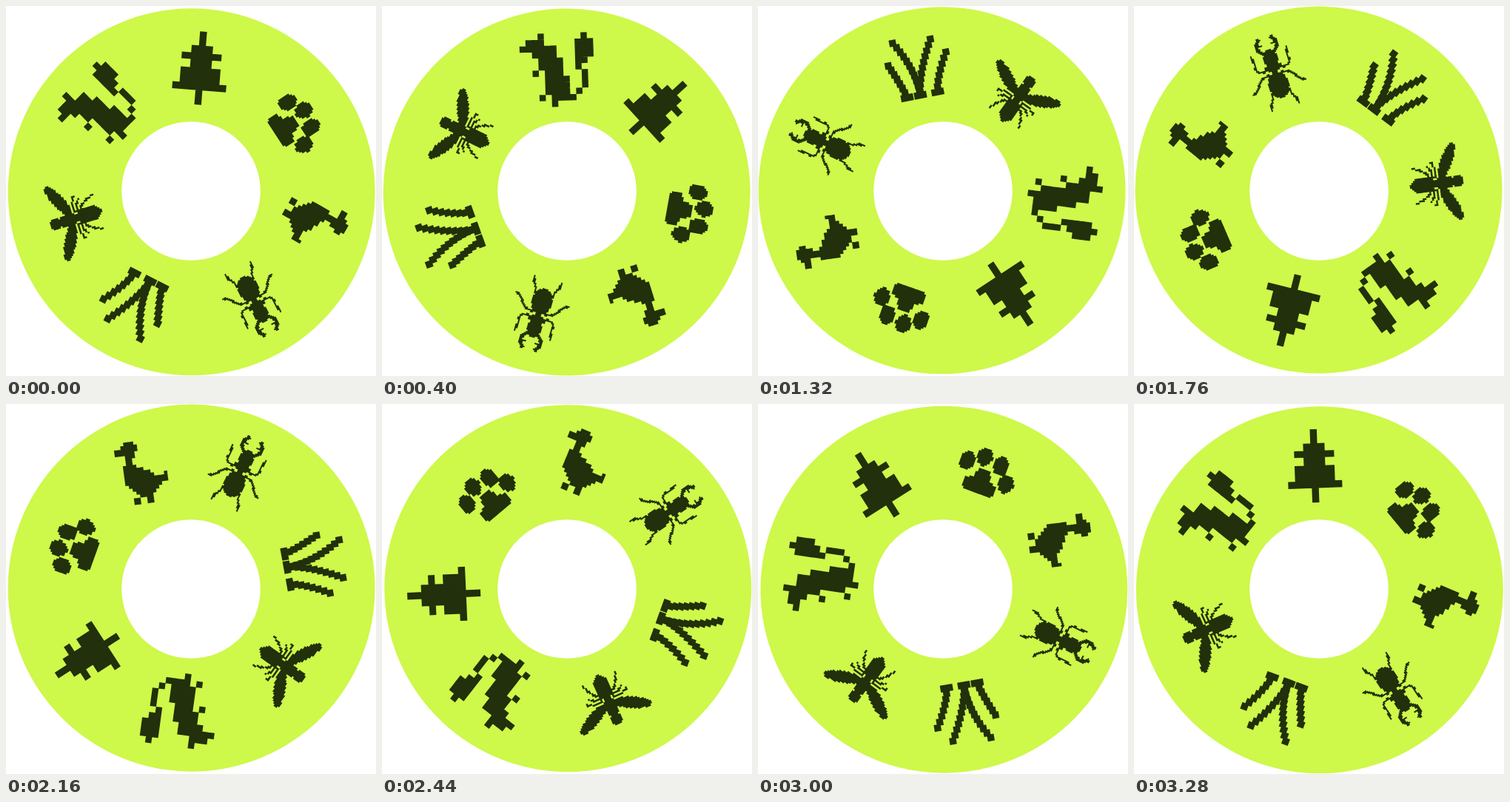
Write an HTML page with a canvas that moves like this. It is 500 by 500 pixels and loops after 3320 ms.

```html
<!DOCTYPE html>
<html lang="en">
<head>
<meta charset="utf-8">
<title>Nature wheel</title>
<style>
  html, body { margin: 0; width: 100%; height: 100%; overflow: hidden; background: #fff; }
  canvas { display: block; width: 500px; height: 500px; }
</style>
</head>
<body>
<canvas id="stage"></canvas>
<script>
const LOOP = 3320, STEP_MS = 40, STEP_DEG = 4.31;
const LIME = '#cef84a', DARK = '#22300b';
const MID = 250;
const rad = deg => deg * Math.PI / 180;

const canvas = document.getElementById('stage');
const ctx = canvas.getContext('2d');
const probe = document.createElement('canvas').getContext('2d');
const density = window.devicePixelRatio || 1;
canvas.width = canvas.height = 500 * density;

// Collects ovals and limbs, then rasterises them to square cells
function pixelate(cell, build) {
  const solids = new Path2D(), limbs = [], shape = new Path2D();
  build({
    oval(x, y, rx, ry, turn = 0) {
      const part = new Path2D();
      part.ellipse(x, y, rx, ry, rad(turn), 0, 2 * Math.PI);
      solids.addPath(part);
    },
    limb(width, d) { limbs.push([width, new Path2D(d)]); },
    solid(d) { solids.addPath(new Path2D(d)); },
    dot(x, y) { solids.rect(x, y, cell, cell); }
  });
  const filled = (i, j) => {
    const x = (i + 0.5) * cell, y = (j + 0.5) * cell;
    return probe.isPointInPath(solids, x, y) || limbs.some(([width, path]) => {
      probe.lineWidth = width;
      return probe.isPointInStroke(path, x, y);
    });
  };
  const n = Math.ceil(60 / cell), lap = cell * 0.02;
  for (let j = -n; j < n; j++) {
    for (let i = -n; i < n; i++) {
      if (filled(i, j)) shape.rect(i * cell, j * cell, cell + lap, cell + lap);
    }
  }
  return shape;
}

const bothSides = draw => [-1, 1].forEach(draw);

function makeTree() {
  const shape = new Path2D();
  const tier = (half, top, bottom) => shape.rect(-half, top, 2 * half, bottom - top);
  tier(4.7, 34, 133);
  tier(14.5, 53, 84);
  tier(27, 63, 72);
  tier(27, 83, 113);
  tier(36.5, 104, 113.5);
  return shape;
}

// Blocks stacked along a stem that leans more and more towards its tip
function makeGrass() {
  const shape = new Path2D(), size = 9.3, ground = 35;
  const blade = (root, tipX, tipY, bend) => {
    const rows = Math.round((ground - tipY) / 7);
    for (let i = 0; i <= rows; i++) {
      const t = i / rows, x = root + (tipX - root) * t ** bend;
      shape.rect(x - size / 2, ground + (tipY - ground) * t - size / 2, size, size);
    }
    shape.rect(root - 8.5, ground - size / 2, 17, size);
  };
  blade(-20, -37, -12, 1.2);
  blade(-1.8, -25.6, -41, 2);
  blade(-1.8, 25.6, -37, 1.5);
  blade(22, 43, -16, 1.45);
  return shape;
}

const squirrel = pixelate(1, pen => {
  pen.dot(3, 0);
  pen.dot(0, 2);
  pen.limb(2, 'M1 2H4');
  pen.limb(3.6, 'M4 2.5L6.5 9.5');
  pen.oval(6, 8.5, 2.1, 2.1);
  pen.limb(1, 'M5 10.5H9');
  pen.dot(2, 6);
  pen.dot(3, 10);
  pen.dot(5, 11);
  pen.dot(9, 9);
  pen.limb(1, 'M10.5 6V9');
  pen.dot(9, 5);
  pen.oval(10.4, 2.7, 1.6, 2.25);
});

const paw = pixelate(2.8, pen => {
  pen.oval(0, -5, 12, 13);
  pen.oval(0, 7, 15, 9);
  bothSides(s => pen.oval(s * 11.6, 7.4, 12, 10));
  for (let i = 0; i < 4; i++) {
    const a = rad(217 + 43 * i);
    pen.oval(34 * Math.cos(a), 34 * Math.sin(a), 10.5, 12.7);
  }
});

const goose = pixelate(4.5, pen => {
  pen.oval(-12, -35, 11, 11.5);
  pen.limb(8, 'M-30 -33H-12');
  pen.limb(9.5, 'M-11 -27L-14 -10');
  pen.solid('M-22 -14L-3 -11 22 4 35 1V11L16 26 -3 32 -24 10Z');
  pen.limb(9, 'M11 24V42M-14 37H-4');
});

const beetle = pixelate(2, pen => {
  pen.oval(0, 18, 14, 18);
  pen.oval(0, -7, 12, 5.5);
  pen.oval(0, -19, 9.5, 13);
  pen.oval(0, -1, 3, 3);
  bothSides(s => {
    pen.limb(5, `M${s * 5} -26Q${s * 17} -35 ${s * 13} -42L${s * 8} -49`);
    pen.limb(3, `M${s * 13} -40L${s * 7} -39`);
    pen.limb(3, `M${s * 8} -5Q${s * 27} -2 ${s * 23} -16L${s * 25} -29`);
    pen.limb(3, `M${s * 8} 2Q${s * 25} 3 ${s * 27} 15L${s * 37} 22`);
    pen.limb(3, `M${s * 11} 25Q${s * 14} 38 ${s * 18} 42L${s * 19} 49`);
  });
});

const bee = pixelate(2.5, pen => {
  pen.oval(0, -28, 8.5, 7.5);
  pen.oval(0, -10, 9, 15);
  pen.oval(0, 19, 10.5, 18);
  bothSides(s => {
    pen.oval(s * 28, -15.5, 27, 7.8, -26 * s);
    pen.limb(2.7, `M${s * 7} 3Q${s * 20} -1 ${s * 30} 6`);
    pen.limb(2.7, `M${s * 7} 6Q${s * 20} 5 ${s * 25} 13`);
    pen.limb(2.7, `M${s * 7} 9Q${s * 19} 12 ${s * 24} 33`);
  });
});

// Each drawing is laid out at x, y with a tilt while the wheel is at `turn`
const icons = [
  { shape: makeTree(), turn: -4.5, x: MID, y: 0 },
  { shape: squirrel, turn: 45, x: 192.2, y: 36.2, size: 8.3 },
  { shape: paw, turn: 297, x: 231.5, y: 97, tilt: -6 },
  { shape: goose, turn: 232.4, x: 181, y: 95, tilt: -8 },
  { shape: beetle, turn: 297, x: 421, y: 241, tilt: 90 },
  { shape: makeGrass(), turn: 142, x: 214, y: 86, tilt: -11 },
  { shape: bee, turn: 99, x: 238, y: 90, tilt: -8 }
];

function turnTo(deg) {
  ctx.translate(MID, MID);
  ctx.rotate(rad(deg));
  ctx.translate(-MID, -MID);
}

function disc(x, y, r, color) {
  ctx.fillStyle = color;
  ctx.beginPath();
  ctx.arc(x, y, r, 0, 2 * Math.PI);
  ctx.fill();
}

function draw(now) {
  const angle = Math.floor(now % LOOP / STEP_MS) * STEP_DEG;
  ctx.setTransform(density, 0, 0, density, 0, 0);
  ctx.fillStyle = '#fff';
  ctx.fillRect(0, 0, 500, 500);

  // The disc sits slightly off the pivot, so it wobbles
  ctx.save();
  turnTo(angle);
  disc(MID + 0.7, MID + 1.35, 248, LIME);
  ctx.restore();
  disc(MID, MID, 93.8, '#fff');

  ctx.fillStyle = DARK;
  for (const { shape, turn, x, y, tilt = 0, size = 1 } of icons) {
    ctx.save();
    turnTo(angle - turn);
    ctx.translate(x, y);
    ctx.rotate(rad(tilt));
    ctx.scale(size, size);
    ctx.fill(shape);
    ctx.restore();
  }
}

function tick() {
  draw(performance.now());
  requestAnimationFrame(tick);
}
tick();
</script>
</body>
</html>
```
